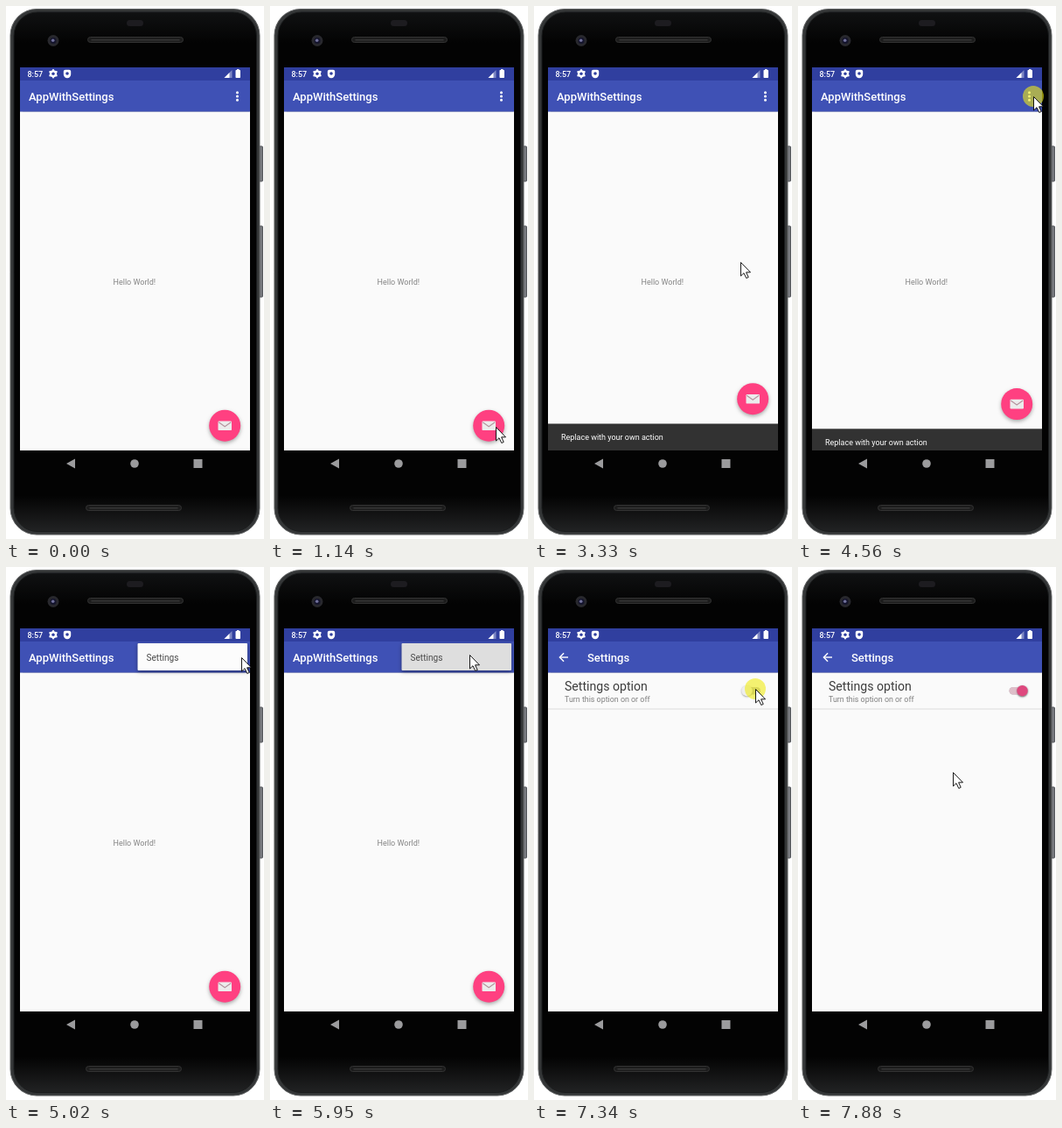
An HTML page with a canvas for the animation above (8 s loop, 295 by 608 pixels).

```html
<!DOCTYPE html>
<html lang="en">
<head>
<meta charset="utf-8">
<style>
html, body { margin: 0; width: 100%; height: 100%; overflow: hidden; background: #fff; }
canvas { display: block; width: 295px; height: 608px; }
</style>
</head>
<body>
<canvas></canvas>
<script>
const LOOP = 8000, W = 295, H = 608;
const LEFT = 16, TOP = 70, WIDTH = 263, BOTTOM = 507, BAR_END = 120.5;
const BLUE = '#3f51b5', DARK_BLUE = '#303f9f', PINK = '#ff4081', PAGE = '#fafafa';
const canvas = document.querySelector('canvas');
const c = canvas.getContext('2d');
const dpr = window.devicePixelRatio || 1;
canvas.width = W * dpr;
canvas.height = H * dpr;

const progress = (t, from, to) => Math.min(1, Math.max(0, (t - from) / (to - from)));
const easeInOut = u => u * u * (3 - 2 * u);
const easeOut = u => 1 - (1 - u) ** 3;
const mix = (a, b, u) => a + (b - a) * u;

// Each pointer move eases to (x, y), optionally bowing sideways on the way.
const ENTRY = { x: 264, y: 590 };
const MOVES = [
  { from: 530, to: 1140, x: 258, y: 480 },
  { from: 2480, to: 3010, x: 240, y: 291, bow: 20 },
  { from: 3250, to: 3330, x: 236, y: 292 },
  { from: 3330, to: 4300, x: 269, y: 103, bow: -26 },
  { from: 5100, to: 5410, x: 228, y: 100 },
  { from: 6410, to: 7190, x: 253, y: 139 },
  { from: 7480, to: 7880, x: 177, y: 234 }
];
const CLICKS = [1390, 4490, 5640, 7340], CLICK_TIME = 160;

function pointerAt(t) {
  let { x, y } = ENTRY;
  for (const move of MOVES) {
    const u = easeInOut(progress(t, move.from, move.to));
    x = mix(x, move.x, u) + (move.bow || 0) * Math.sin(Math.PI * u);
    y = mix(y, move.y, u);
  }
  return [x, y];
}

function rect(x, y, w, h, fill) {
  c.fillStyle = fill;
  c.fillRect(x, y, w, h);
}
function rounded(x, y, w, h, r, fill, stroke) {
  c.beginPath();
  c.roundRect(x, y, w, h, r);
  c.fillStyle = fill;
  c.fill();
  if (stroke) { c.strokeStyle = stroke; c.lineWidth = 1; c.stroke(); }
}
function circle(x, y, r, fill) {
  c.beginPath();
  c.arc(x, y, r, 0, 7);
  c.fillStyle = fill;
  c.fill();
}
function triangle(x1, y1, x2, y2, x3, y3, fill) {
  c.beginPath();
  c.moveTo(x1, y1);
  c.lineTo(x2, y2);
  c.lineTo(x3, y3);
  c.fillStyle = fill;
  c.fill();
}
function chevron(x, y, dx, dy, color, width) {
  c.beginPath();
  c.moveTo(x - dx, y - dy);
  c.lineTo(x, y);
  c.lineTo(dx > dy ? x + dx : x - dx, dx > dy ? y - dy : y + dy);
  c.strokeStyle = color;
  c.lineWidth = width;
  c.stroke();
}
function text(s, x, y, size, color, weight = 400) {
  c.font = `${weight} ${size}px Roboto, sans-serif`;
  c.fillStyle = color;
  c.fillText(s, x, y);
}
function shadowed(blur, dy, alpha, draw) {
  c.save();
  c.shadowColor = `rgba(0,0,0,${alpha})`;
  c.shadowBlur = blur * dpr;
  c.shadowOffsetY = dy * dpr;
  draw();
  c.restore();
}
function clipped(x, y, w, h, draw) {
  c.save();
  c.beginPath();
  c.rect(x, y, w, h);
  c.clip();
  draw();
  c.restore();
}
function faded(alpha, draw) {
  c.save();
  c.globalAlpha *= alpha;
  draw();
  c.restore();
}

function phone() {
  for (const [y, h] of [[160, 40], [251, 81]]) {
    rounded(288, y, 5.5, h, 1, '#77797e', '#55575b');
  }
  const body = c.createLinearGradient(0, 7, 0, 600);
  body.addColorStop(0, '#101112');
  body.addColorStop(0.06, '#030303');
  body.addColorStop(0.93, '#030303');
  body.addColorStop(1, '#222324');
  rounded(5, 3.5, 285, 599.5, 30, '#343637', '#626465');
  rounded(9, 7, 277.5, 592.5, 27, body, '#1b1d1e');
  rounded(138, 16, 19, 7, 3.5, '#1d1c20');
  circle(54, 39.5, 6.5, '#28282d');
  circle(54, 39.5, 3.5, '#14142c');
  circle(53.7, 39.3, 1.8, '#70709a');
  for (const [x, y] of [[93.5, 35.5], [91.5, 569.5]]) {
    rounded(x, y, 109, 6, 3, '#1c1c1c', '#333');
    rect(x + 4, y + 2.5, 101, 1.5, '#353535');
  }
}

function navButtons() {
  const grey = '#9b9b9d';
  triangle(69, 522, 79, 516.5, 79, 527.5, grey);
  circle(147, 522, 4.8, grey);
  rect(214.5, 517, 10, 10, grey);
}

function statusIcons() {
  text('8:57', 24.5, 81, 9, '#fff', 500);
  circle(54, 77.3, 4.1, '#fff');
  for (let i = 0; i < 6; i++) {
    const a = (i + 0.5) * Math.PI / 3;
    circle(54 + 4.2 * Math.cos(a), 77.3 + 4.2 * Math.sin(a), 1.1, '#fff');
  }
  circle(54, 77.3, 1.7, DARK_BLUE);
  rounded(65.8, 72.8, 8.4, 9.4, [2, 2, 4.2, 4.2], '#fff');
  circle(70, 77, 1.8, DARK_BLUE);
  triangle(249.5, 82, 258.5, 82, 258.5, 73, '#7d87c3');
  triangle(249.5, 82, 255.5, 82, 255.5, 76, '#fff');
  rounded(262.5, 73, 5.5, 9, 0.8, '#fff');
  rect(264, 72, 2.5, 1.5, '#fff');
}

function page(title, titleX) {
  rect(LEFT, TOP, WIDTH, BOTTOM - TOP, PAGE);
  shadowed(1, 0.5, 0.2, () => rect(LEFT, TOP, WIDTH, BAR_END - TOP, BLUE));
  rect(LEFT, TOP, WIDTH, 15, DARK_BLUE);
  text(title, titleX, 108, 13, '#fff', 500);
}

function mailButton(y) {
  shadowed(4, 2, 0.32, () => circle(250.2, y, 18, PINK));
  rounded(242.5, y - 5.2, 15.5, 10.6, 1.2, '#ececec');
  chevron(250.2, y + 1, 7, 5, '#b5949e', 1.1);
}

function ripple(x, y, radius, t, from, to, rgb, alpha) {
  if (t < from || t >= to) return;
  const u = progress(t, from, to);
  circle(x, y, radius * easeOut(u), `rgba(${rgb},${alpha * (1 - u * u)})`);
}

function popup(t) {
  const open = easeInOut(progress(t, 4720, 5020));
  const w = mix(60, 125.5, open), h = mix(14, 31, open), x = 276 - w;
  const grey = mix(252, 222, progress(t, 5740, 5950));
  faded(open * (1 - progress(t, 6100, 6250)), () => {
    shadowed(4, 1.5, 0.4, () => rounded(x, 87, w, h, 1, `rgb(${grey},${grey},${grey})`));
    clipped(x, 87, w, h, () => text('Settings', 160.5, 106.7, 10.1, '#4a4a4a'));
  });
}

function mainPage(t) {
  page('AppWithSettings', 26);
  for (let i = -1; i <= 1; i++) circle(264.5, 103 + 4.3 * i, 1.5, '#fff');
  ripple(264.5, 103, 26, t, 4590, 4940, '255,255,255', 0.2);
  text('Hello World!', 122.5, 317.5, 9, '#858585');

  const shown = easeInOut(progress(t, 1540, 1840)) - easeInOut(progress(t, 4480, 4770));
  const rise = 30.5 * shown;
  mailButton(478.7 - rise);
  clipped(LEFT, TOP, WIDTH, BOTTOM - TOP, () => {
    rect(LEFT, BOTTOM - rise, WIDTH, 31, '#323232');
    text('Replace with your own action', 31, BOTTOM + 18.7 - rise, 9, '#fff');
  });
  popup(t);
}

function toggle(t) {
  const on = easeInOut(progress(t, 7480, 7700));
  const layer = (track, thumb) => {
    rounded(241.5, 137, 17.5, 8.5, 4.2, track);
    shadowed(2, 0.8, 0.35, () => circle(mix(243.5, 256.5, on), 141.2, 6.2, thumb));
  };
  layer('#b8b8bc', '#eee');
  faded(on, () => layer('#debec9', '#de487e'));
}

function settingsPage(t) {
  page('Settings', 61);
  rect(30, 102.3, 9, 1.4, '#fff');
  c.save();
  c.translate(29.4, 103);
  c.scale(-1, 1);
  chevron(0, 0, 4.7, 4.7, '#fff', 1.4);
  c.restore();
  clipped(LEFT, BAR_END, WIDTH, 41, () =>
    ripple(253, 139, 228, t, 7480, 7860, '0,0,0', 0.1));
  text('Settings option', 35, 140.7, 14.1, '#3c3c3c');
  text('Turn this option on or off', 35, 154, 8.9, '#808080');
  rect(LEFT, 161.5, WIDTH, 1, '#dedede');
  toggle(t);
}

// The new page is revealed upwards while it slides the last few pixels into place.
function enterSettings(t) {
  const offset = 18 * (1 - easeOut(progress(t, 6100, 6500)));
  const top = mix(BOTTOM, TOP, easeOut(progress(t, 6100, 6330)));
  clipped(LEFT, top, WIDTH, BOTTOM + offset - top, () => {
    c.translate(0, offset);
    settingsPage(t);
  });
}

function pointer(t) {
  if (t < MOVES[0].from) return;
  const [x, y] = pointerAt(t);
  if (CLICKS.some(start => t >= start && t < start + CLICK_TIME)) {
    circle(x, y, 12, 'rgba(240,235,20,0.6)');
  }
  c.save();
  c.translate(x + 0.5, y + 0.5);
  const arrow = new Path2D('M0 0V15.5L3.5 12.2L6.3 18L8.7 16.9L6.1 11.3H11Z');
  c.fillStyle = '#fff';
  c.fill(arrow);
  c.strokeStyle = '#000';
  c.lineWidth = 0.9;
  c.stroke(arrow);
  c.restore();
}

function draw(t) {
  c.setTransform(dpr, 0, 0, dpr, 0, 0);
  rect(0, 0, W, H, '#fff');
  phone();
  mainPage(t);
  if (t >= 6100) enterSettings(t);
  statusIcons();
  navButtons();
  pointer(t);
}

const start = performance.now();
function tick() {
  draw((performance.now() - start) % LOOP);
  requestAnimationFrame(tick);
}
tick();
</script>
</body>
</html>
```
